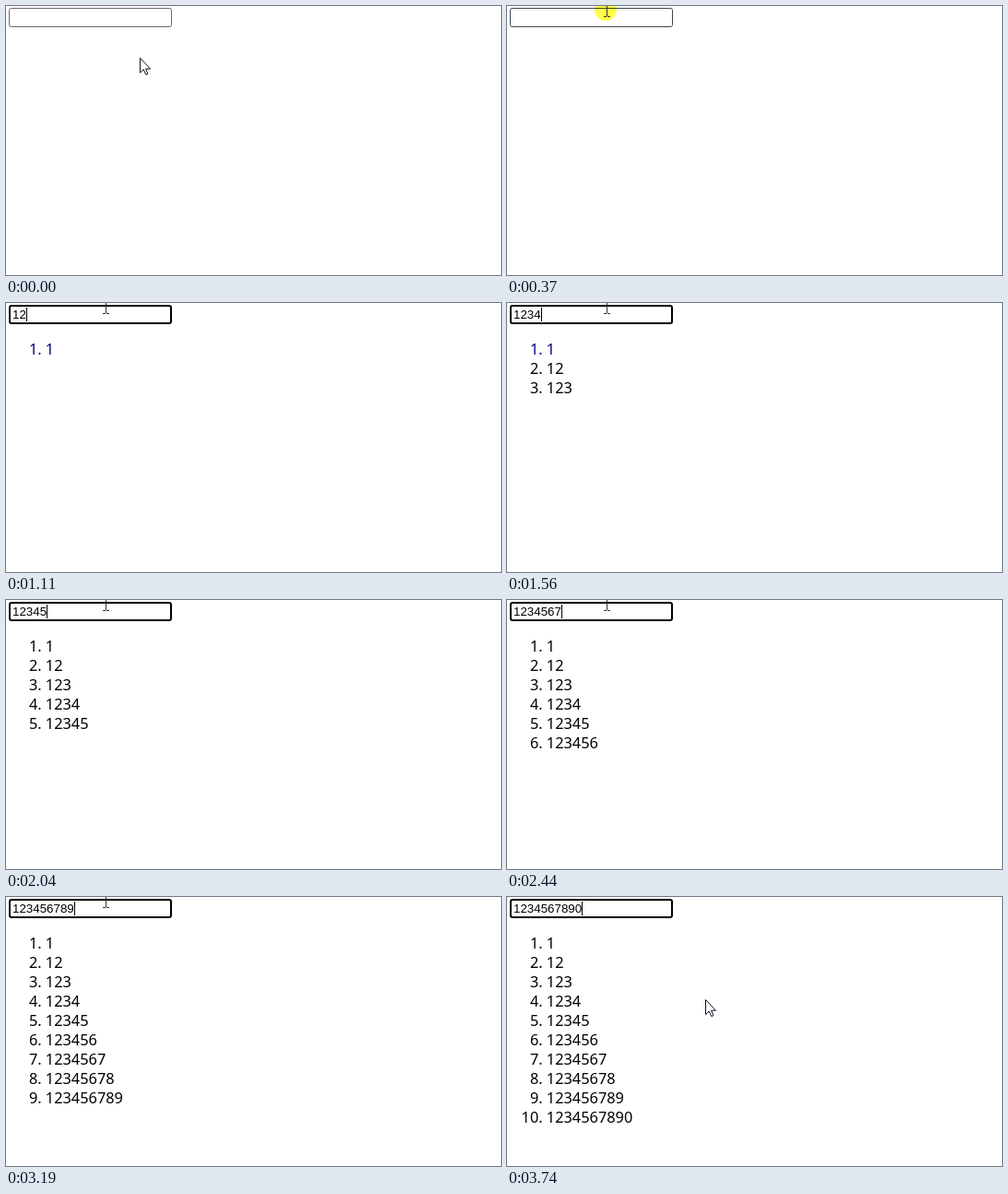
These frames come from a looping animation (537x292 px, 3820 ms). An HTML page with a canvas:

```html
<!DOCTYPE html>
<html lang="en">
<head>
<meta charset="utf-8">
<title>Typing history</title>
<style>
  html, body { margin: 0; width: 100%; height: 100%; overflow: hidden; background: #fff; }
  canvas { display: block; }
</style>
</head>
<body>
<canvas id="stage" width="537" height="292"></canvas>
<script>
const ctx = document.getElementById('stage').getContext('2d');
const LOOP = 3820;
const DIGITS = '1234567890';
const typedAt = [930, 1110, 1310, 1560, 1880, 2210, 2440, 2760, 3090, 3360];
const listedAt = [1020, 1250, 1480, 1710, 2040, 2290, 2590, 2840, 3190, 3570];

// [start, x, y, shape]
const cursorSteps = [
  [0, 145, 56, drawArrow], [70, 140, 47, drawArrow], [145, 125, 25, drawArrow],
  [220, 111, 7, drawBeam], [295, 108, 4, drawBeam],
  [3360, 167, 100, drawArrow], [3570, 205, 110, drawArrow], [3655, 215, 111, drawArrow]
];

const countPassed = (times, t) => times.filter(start => start <= t).length;

function drawArrow(x, y) {
  const arrow = new Path2D('M.5 .5V16.5L4.2 13L6.8 18.6L9 17.6L6.5 12.2H11.5Z');
  ctx.save();
  ctx.translate(x, y);
  ctx.fillStyle = '#fff';
  ctx.fill(arrow);
  ctx.strokeStyle = '#101020';
  ctx.lineWidth = 1;
  ctx.stroke(arrow);
  ctx.restore();
}

function drawBeam(x, y) {
  ctx.fillStyle = '#333';
  ctx.fillRect(x, y - 4, 1, 11);
  ctx.fillRect(x - 3, y + 7, 3, 1);
  ctx.fillRect(x + 1, y + 7, 3, 1);
}

function drawField(t) {
  const focused = t >= 480;
  const line = focused ? 2 : 1;
  ctx.lineWidth = line;
  ctx.strokeStyle = focused ? '#000' : t >= 220 ? '#3c4650' : '#6e6472';
  ctx.beginPath();
  ctx.roundRect(3 + line / 2, 2 + line / 2, 177 - line, 21 - line, 2);
  ctx.stroke();
  if (!focused) return;

  const count = countPassed(typedAt, t);
  ctx.font = '13.333px "Liberation Sans", Arial, sans-serif';
  ctx.textAlign = 'left';
  ctx.fillStyle = '#000';
  ctx.fillText(DIGITS.slice(0, count), 7, 17);
  ctx.fillRect(Math.round(7 + count * 7.415), 5, 1, 15);
}

function drawList(t) {
  ctx.font = '16.35px "Noto Sans", "Open Sans", sans-serif';
  const count = countPassed(listedAt, t);
  for (let i = 0; i < count; i++) {
    const y = 56 + 21 * i;
    ctx.fillStyle = i === 0 && t < 1880 ? '#000080' : '#000';
    ctx.textAlign = 'right';
    ctx.fillText(i + 1, 34.3, y);
    ctx.textAlign = 'left';
    ctx.fillText('.', 34.3, y);
    ctx.fillText(DIGITS.slice(0, i + 1), 42.8, y);
  }
}

function drawClick() {
  ctx.save();
  ctx.globalCompositeOperation = 'multiply';
  ctx.fillStyle = '#ffff48';
  ctx.beginPath();
  ctx.arc(107, 4, 12, 0, 2 * Math.PI);
  ctx.fill();
  ctx.restore();
}

function render(now) {
  const t = now % LOOP;
  ctx.fillStyle = '#fff';
  ctx.fillRect(0, 0, 537, 292);
  drawField(t);
  drawList(t);
  if (t >= 370 && t < 540) drawClick();
  const [, x, y, drawCursor] = cursorSteps.findLast(step => step[0] <= t);
  drawCursor(x, y);
}

const started = performance.now();
function tick() {
  render(performance.now() - started);
  requestAnimationFrame(tick);
}
tick();
</script>
</body>
</html>
```
